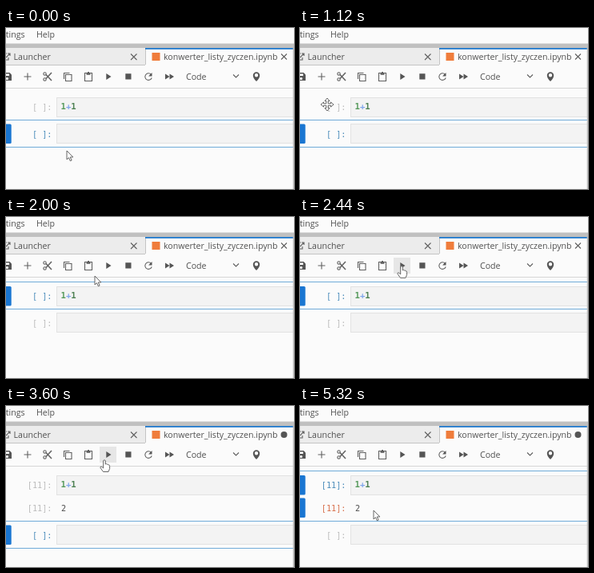
An HTML page that plays this animation: 360 px wide and 202 px high, repeating every 5360 ms.

```html
<!DOCTYPE html>
<html lang="en">
<head>
<meta charset="utf-8">
<title>Notebook cell run</title>
<style>
  html, body { margin: 0; width: 100%; height: 100%; overflow: hidden; background: #fbfbfb; }
  svg { display: block; width: 100vw; height: 100vh; }
  text { font: 10.6px "Open Sans", "Noto Sans", sans-serif; fill: #505050; }
  .mono { font: 10.2px "DejaVu Sans Mono", monospace; }
  .code { font: bold 10.6px "DejaVu Sans Mono", monospace; }
  .icon { fill: none; stroke: #606060; stroke-width: 1.1; }
  .solid { fill: #555; }
  .box { fill: #f3f3f3; stroke: #e2e2e2; }
  .pointer { fill: #fff; stroke: #555; stroke-width: .9; stroke-linejoin: round; }
</style>
</head>
<body>
<svg viewBox="0 0 360 202" preserveAspectRatio="none">
  <rect width="360" height="202" fill="#fbfbfb"/>
  <text x="23.5" y="12" text-anchor="end">ttings</text>
  <text x="38" y="12">Help</text>

  <!-- tabs -->
  <rect y="19.5" width="360" height="5.5" fill="#c0c0c0"/>
  <rect y="25" width="174" height="21" fill="#ececec"/>
  <path d="M0 46.5H174M174.5 25V46" stroke="#c4c4c4"/>
  <rect x="174" y="25" width="186" height="1.8" fill="#1f78cc"/>
  <path class="icon" d="M0 32H1M2 32H5V35M5 32L0 37M3 37V40H0"/>
  <text x="9.5" y="40.3">Launcher</text>
  <path class="icon" d="M156 32.5L163.5 40M163.5 32.5L156 40"/>
  <rect x="182.5" y="31" width="10" height="10" fill="#ef7d3c"/>
  <text x="197" y="40.3">konwerter_listy_zyczen.ipynb</text>
  <path id="close" class="icon" d="M344 32.5L351 39.5M351 32.5L344 39.5"/>
  <circle id="dirty" class="solid" cx="347.5" cy="36" r="4"/>

  <!-- toolbar -->
  <path d="M0 75.5H360" stroke="#d6d6d6"/>
  <rect id="hover" x="117" y="51" width="21" height="20" fill="#e6e6e6"/>
  <path class="solid" d="M0 56H4.5L7 58.5V66H0Z"/>
  <path d="M0 57.5H4V60H0Z" fill="#fff"/>
  <circle cx="1.5" cy="63.5" r="1.6" fill="#fff"/>
  <g class="icon">
    <path d="M22.5 61H31.5M27 56.5V65.5"/>
    <circle cx="48.5" cy="57.5" r="1.7"/><circle cx="48.5" cy="64.5" r="1.7"/>
    <path d="M50 58.5L57 66M50 63.5L57 56" stroke-width="1.5"/>
    <path d="M72.5 64V56.5H79.5M74.5 58.5H82V66.5H74.5Z"/>
    <path d="M98.5 56.5H107.5V66.5H98.5Z"/>
    <path d="M100.5 57.5H105.5" stroke-width="2.6"/>
    <path d="M102 55.5H104"/>
    <path d="M181.3 58.2A4.3 4.3 0 1 0 182.2 62.5"/>
    <path d="M284 58.5L287.5 62L291 58.5"/>
  </g>
  <path class="solid" d="M125.3 57L131.5 61L125.3 65ZM149.3 57.3H156.5V64.5H149.3ZM182.5 56V60.5H178ZM199 57.5L204.5 61L199 64.5ZM204.5 57.5L210 61L204.5 64.5Z"/>
  <text x="225" y="65">Code</text>
  <path class="solid" fill-rule="evenodd" d="M313 67C310 64 308.8 62 308.8 59.5A4.2 4.2 0 0 1 317.2 59.5C317.2 62 316 64 313 67ZM313 57.1A2.2 2.2 0 1 0 313 61.5A2.2 2.2 0 1 0 313 57.1Z"/>

  <!-- cells -->
  <path id="edges" stroke="#6fabd9" stroke-width="1.2"/>
  <path id="bars" fill="#1976d2"/>
  <rect class="box" x="63.5" y="87.5" width="300" height="24"/>
  <text id="prompt1" class="mono" x="57.5" y="102.5" text-anchor="end"></text>
  <text class="code" x="68.5" y="102"><tspan fill="#579a5c">1</tspan><tspan fill="#7fa6ec">+</tspan><tspan fill="#4d8052">1</tspan></text>
  <g id="output">
    <text id="promptOut" class="mono" x="57.5" y="132" text-anchor="end">[11]:</text>
    <text class="mono" x="69" y="132">2</text>
  </g>
  <g id="lastCell">
    <rect class="box" x="63.5" y="120.5" width="300" height="24"/>
    <text id="prompt2" class="mono" x="57.5" y="136.5" text-anchor="end">[ ]:</text>
  </g>
  <rect x="358.7" y="20" width="1.3" height="182" fill="#c0c0c0"/>

  <g id="cursor">
    <path id="arrow" class="pointer" d="M0 0V11L2.5 8.7L4.3 12.8L6.1 12L4.3 8H7.8Z"/>
    <path id="move" class="pointer" d="M0 -8L3 -4.5H1.2V-1.2H4.5V-3L8 0L4.5 3V1.2H1.2V4.5H3L0 8L-3 4.5H-1.2V1.2H-4.5V3L-8 0L-4.5 -3V-1.2H-1.2V-4.5H-3Z"/>
    <path id="hand" class="pointer" d="M-1.3 .5Q0 -1 1.3 .5V5Q2.5 4 3.5 5.2Q4.7 4.6 5.3 6Q6.6 5.8 6.6 7.5V10.5L5 14.5H-1.5L-5 9.5Q-5.3 7.8 -3.7 8L-1.3 10Z"/>
  </g>
</svg>
<script>
const LOOP = 5360, STEP = 40;
const SELECT_FIRST = 1360, RUN = 2840, RESULT = 3080, SELECT_RUN = 4400;
const OUTPUT_SHIFT = 29;
const $ = id => document.getElementById(id);

const smooth = u => u * u * (3 - 2 * u);
const speedUp = u => u * u;
const slowDown = u => 1 - (1 - u) * (1 - u);

// Pointer stops: time, x, y, easing towards the stop
const stops = [
  [120, 76, 154],
  [1040, 34, 96, smooth],
  [1680, 34, 96, smooth],
  [2000, 111, 74, speedUp],
  [2240, 127, 61, slowDown],
  [2800, 127, 64, smooth],
  [3400, 127, 64, smooth],
  [3600, 123, 68, speedUp],
  [3880, 89, 145, smooth],
  [4160, 92, 131, smooth]
];

function pointerAt(t) {
  const i = stops.findIndex(s => s[0] > t);
  if (i === 0) return stops[0].slice(1, 3);
  if (i < 0) return stops[stops.length - 1].slice(1, 3);
  const [t0, x0, y0] = stops[i - 1], [t1, x1, y1, ease] = stops[i];
  const u = ease((t - t0) / (t1 - t0));
  return [x0 + (x1 - x0) * u, y0 + (y1 - y0) * u];
}

const show = (id, on) => $(id).setAttribute("visibility", on ? "visible" : "hidden");
const tint = (id, on, color) => $(id).style.fill = on ? color : "#bcbcbc";
const bar = (y, h) => `M0 ${y}H5.2Q6.7 ${y} 6.7 ${y + 1.5}V${y + h - 1.5}Q6.7 ${y + h} 5.2 ${y + h}H0Z`;

function drawCells(t) {
  const done = t >= RESULT;
  const first = (t >= SELECT_FIRST && t < RUN) || t >= SELECT_RUN;
  const shift = done ? OUTPUT_SHIFT : 0;
  const top = first ? 81.5 : 115.5 + shift;
  const bottom = first ? 115.5 + shift : 149.5 + shift;

  $("prompt1").textContent = done ? "[11]:" : t >= RUN ? "[*]:" : "[ ]:";
  tint("prompt1", first, "#4a8cba");
  tint("prompt2", !first, "#4a8cba");
  tint("promptOut", first, "#d8704c");
  show("output", done);
  $("lastCell").setAttribute("transform", `translate(0 ${shift})`);
  $("edges").setAttribute("d", `M0 ${top}H360M0 ${bottom}H360`);
  $("bars").setAttribute("d", first ? bar(87, 24.5) + (done ? bar(115.5, 24.5) : "") : bar(120.5 + shift, 24.5));
  show("close", t < RUN);
  show("dirty", t >= RUN);
}

function drawPointer(t) {
  const [x, y] = pointerAt(t);
  const onButton = x >= 117 && x <= 138 && y >= 51 && y <= 71;
  const onPrompt = x < 62 && y > 87 && y < 112;
  $("cursor").setAttribute("transform", `translate(${x} ${y})`);
  show("hand", onButton);
  show("hover", onButton);
  show("move", onPrompt);
  show("arrow", !onButton && !onPrompt);
}

function render(now) {
  const t = Math.floor((now % LOOP) / STEP) * STEP;
  drawCells(t);
  drawPointer(t);
}

function tick() {
  render(performance.now());
  requestAnimationFrame(tick);
}
tick();
</script>
</body>
</html>
```
